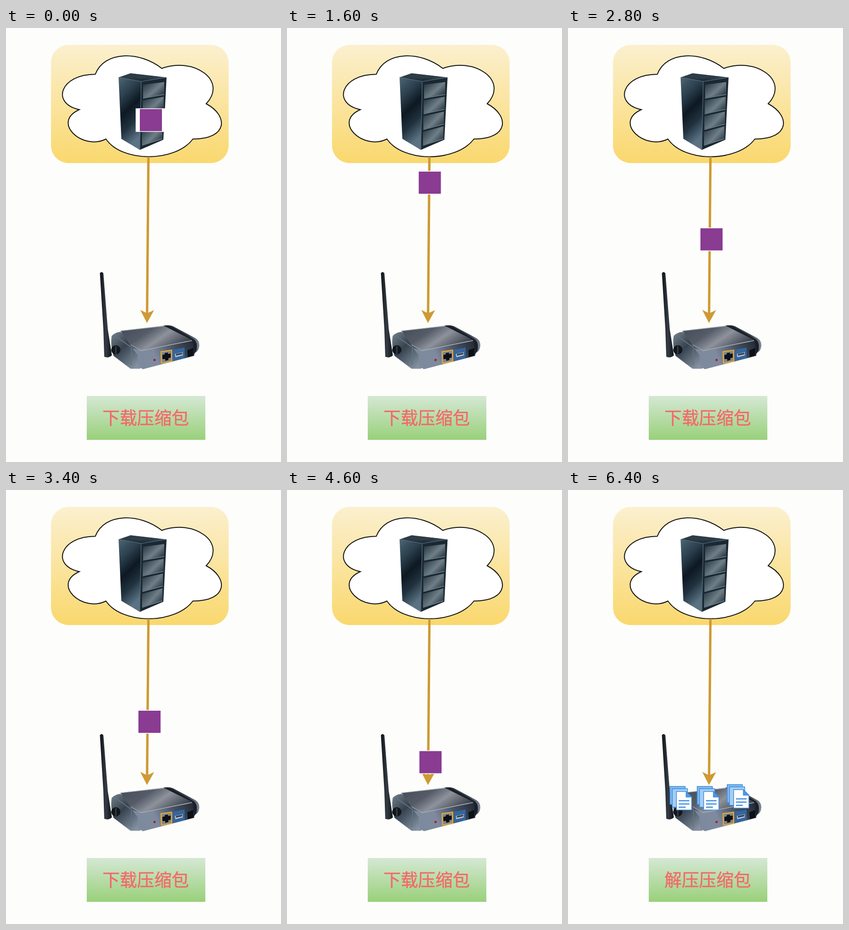
An HTML page that plays this animation: 596 by 940 pixels, repeating every 6.6 s.

```html
<!DOCTYPE html>
<html lang="zh-CN">
<head>
<meta charset="utf-8">
<style>
html, body { margin: 0; width: 100%; height: 100%; overflow: hidden; background: #fdfdfb; }
svg { display: block; width: 596px; height: 940px; }
text { font: 37.5px "Noto Sans CJK SC", "Noto Sans CJK", sans-serif; fill: #f26a69; stroke: #f26a69; stroke-width: .5px; }
</style>
</head>
<body>
<svg viewBox="0 0 596 940">
  <defs>
    <linearGradient id="panel" x2="0" y2="1"><stop stop-color="#fbf0cf"/><stop offset="1" stop-color="#fad86e"/></linearGradient>
    <linearGradient id="label" x2="0" y2="1"><stop stop-color="#d5e8d4"/><stop offset="1" stop-color="#99d07a"/></linearGradient>
    <linearGradient id="side" x2=".3" y2="1"><stop stop-color="#4d6574"/><stop offset=".28" stop-color="#2c404e"/><stop offset=".52" stop-color="#0d1822"/><stop offset=".74" stop-color="#20313e"/><stop offset="1" stop-color="#5a7283"/></linearGradient>
    <linearGradient id="roof"><stop stop-color="#33454f"/><stop offset=".5" stop-color="#1f2d37"/><stop offset="1" stop-color="#3b505c"/></linearGradient>
    <linearGradient id="grille" x2="1" y2=".8"><stop stop-color="#22303a"/><stop offset=".35" stop-color="#54656f"/><stop offset=".6" stop-color="#7b8b93"/><stop offset="1" stop-color="#26353f"/></linearGradient>
    <linearGradient id="lid" x2="1" y2=".5"><stop stop-color="#434b57"/><stop offset=".4" stop-color="#555c68"/><stop offset=".64" stop-color="#8d929b"/><stop offset="1" stop-color="#3a404b"/></linearGradient>
    <linearGradient id="cap" x2=".8" y2="1"><stop stop-color="#74838f"/><stop offset=".45" stop-color="#36424e"/><stop offset="1" stop-color="#8593a3"/></linearGradient>
    <linearGradient id="tail"><stop stop-color="#2a313b"/><stop offset=".7" stop-color="#3a434f"/><stop offset="1" stop-color="#7f8894"/></linearGradient>
    <linearGradient id="face" x2="1" y2="-.2"><stop stop-color="#7d8a9d"/><stop offset=".25" stop-color="#7f8a9f"/><stop offset=".6" stop-color="#465062"/><stop offset="1" stop-color="#1e242e"/></linearGradient>
    <linearGradient id="rod"><stop stop-color="#0f1318"/><stop offset=".5" stop-color="#343b44"/><stop offset="1" stop-color="#0f1318"/></linearGradient>
    <pattern id="mesh" width="3" height="4" patternUnits="userSpaceOnUse"><path d="M0 0V4" stroke="#15202b" stroke-width="1.4"/></pattern>
    <g id="doc" stroke="#3d8cdd" stroke-width="1.5" stroke-linejoin="round">
      <path d="M1 1H34V40H1Z" fill="#82b9ef"/>
      <path d="M6 6H39V46H6Z" fill="#a5cef5"/>
      <path d="M15 12H36L48 24V52H15Z" fill="#fff"/>
      <path d="M36 12V24H48Z" fill="#4f98e2"/>
      <path d="M20 32H43M20 39H43M20 46H35" fill="none" stroke-width="2.4"/>
    </g>
  </defs>

  <rect x="97.500" y="36.500" width="385" height="256" rx="38" fill="url(#panel)"/>
  <path id="cloud" fill="#fff" stroke="#111" stroke-width="2"/>

  <g id="server">
    <path d="M244 107L293 116L290 264L250 240Z" fill="url(#side)"/>
    <path d="M244 107L270 98L348 107L293 116Z" fill="url(#roof)"/>
    <path d="M252 105L272 99L330 105L292 110Z" fill="#2d3d48"/>
    <path d="M293 116L348 107L341 242L290 264Z" fill="#1b2832"/>
    <path d="M293 116L290 263M244 107L293 116L348 107" fill="none" stroke="#566d7c" stroke-width="1.2"/>
    <g id="bays"></g>
  </g>

  <g fill="#ce9a33">
    <path d="M308.700 279L305.700 625" stroke="#ce9a33" stroke-width="5.200"/>
    <path d="M305.500 639L291 610.500L305.800 618L321 611Z"/>
  </g>

  <g id="router">
    <path d="M340 645Q352 642 362 646L411 672Q419 677 419 688Q418 701 408 704L396 680Z" fill="url(#tail)"/>
    <path d="M341 646Q350 643 359 647L407 674Q416 681 413 698L406 710L402 678Z" fill="#1b2028"/>
    <path d="M229 667Q235 660 248 658L292 694L291 738L270 738L233 710Q226 690 229 667Z" fill="url(#cap)"/>
    <path d="M238 668L272 692L271 730" fill="none" stroke="#66727e" stroke-width="2"/>
    <path d="M274 694L293 698L405 677L408 710L297 739L287 734L285 708Z" fill="url(#face)"/>
    <path d="M248 656L342 645L404 676L293 699L268 684Z" fill="url(#lid)"/>
    <path d="M249 656L342 645.500M270 686L293 699L403 677" fill="none" stroke="#a9afb7" stroke-width="1.3"/>
    <circle cx="322" cy="719" r="2.500" fill="#a5202d"/>
    <path d="M336 701L359 698V722L337 726Z" fill="#83858a" stroke="#dba93f" stroke-width="2.500"/>
    <path d="M339 708L344 707V704L351 703V706L357 705V714L352 715V719L345 721V717L339 717Z" fill="#0d1016"/>
    <path d="M362 697L387 692V715L363 721Z" fill="#34669f"/>
    <path d="M366 706L383 702V709L367 713Z" fill="#c3cedb"/>
    <path d="M368 706L382 703V707L368 710Z" fill="#3c4655"/>
    <path d="M393 698L406 693V709L394 713Z" fill="#0c1017"/>
    <ellipse cx="238" cy="697" rx="10" ry="10" fill="#11161b"/>
    <path d="M238 689V706" stroke="#333d43" stroke-width="3"/>
    <path d="M203.500 531Q207 526 211 531L220.500 652L229.500 709Q222 716 213 712L211 652Z" fill="url(#rod)"/>
  </g>

  <g id="docs">
    <use href="#doc" x="344" y="637"/>
    <use href="#doc" x="279" y="641"/>
    <use href="#doc" x="220" y="641"/>
  </g>

  <g id="pack">
    <rect width="66" height="51" fill="#fff"/>
    <rect x="9" y="1.500" width="48" height="48" fill="#8a3b92"/>
  </g>

  <rect x="175" y="797" width="257" height="95" fill="url(#label)"/>
  <text id="caption" x="302.800" y="857.500" text-anchor="middle"></text>
</svg>
<script>
const $ = id => document.getElementById(id);
const LOOP = 6600, STEP = 200;

// Cloud as fractions of the panel box
const curves = [
  [.05, .25, 0, .5, .16, .55], [0, .66, .18, .9, .31, .8], [.4, 1, .7, 1, .8, .8],
  [1, .8, 1, .6, .875, .5], [1, .3, .8, .1, .625, .2], [.5, .05, .3, .05, .25, .25]
];
const fit = (v, i) => i % 2 ? 36.5 + v * 255 : 97.4 + v * 384.5;
$('cloud').setAttribute('d', `M${fit(.25, 0)} ${fit(.25, 1)}` +
  curves.map(c => 'C' + c.map(fit).join(' ')).join('') + 'Z');

$('bays').innerHTML = [0, 1, 2, 3].map(i => {
  const l = 297 - i * .7, r = 343 - i * 1.4, a = 123 + i * 34, b = 117 + i * 32;
  const d = `M${l} ${a}L${r} ${b}V${b + 26}L${l} ${a + 28}Z`;
  return `<path d="${d}" fill="url(#grille)"/><path d="${d}" fill="url(#mesh)" opacity=".5"/>` +
    `<path d="M${l} ${a + 29}L${r} ${b + 27}" stroke="#74899a" stroke-width="1.5"/>`;
}).join('');

// [time, x, y] of the package
const route = [[0, 281, 174], [1000, 275, 231], [2200, 278, 388], [3400, 278, 476.5], [4600, 278, 564]];
const TEXT_AT = 5000, UNPACK_AT = 5800;

function place(t) {
  const i = route.findIndex(p => p[0] > t);
  if (i < 0) return route.at(-1).slice(1);
  const a = route[i - 1], b = route[i], k = (t - a[0]) / (b[0] - a[0]);
  return [1, 2].map(n => a[n] + (b[n] - a[n]) * k);
}

function draw(now) {
  const t = Math.floor(now % LOOP / STEP) * STEP;
  $('pack').setAttribute('transform', `translate(${place(t)})`);
  $('pack').style.display = t < UNPACK_AT ? '' : 'none';
  $('caption').textContent = t < TEXT_AT ? '下载压缩包' : '解压压缩包';
  [...$('docs').children].forEach((doc, i) => {
    doc.style.display = t >= UNPACK_AT + (i + 1) * STEP ? '' : 'none';
  });
}

const start = performance.now();
function tick() {
  draw(performance.now() - start);
  requestAnimationFrame(tick);
}
tick();
</script>
</body>
</html>
```
